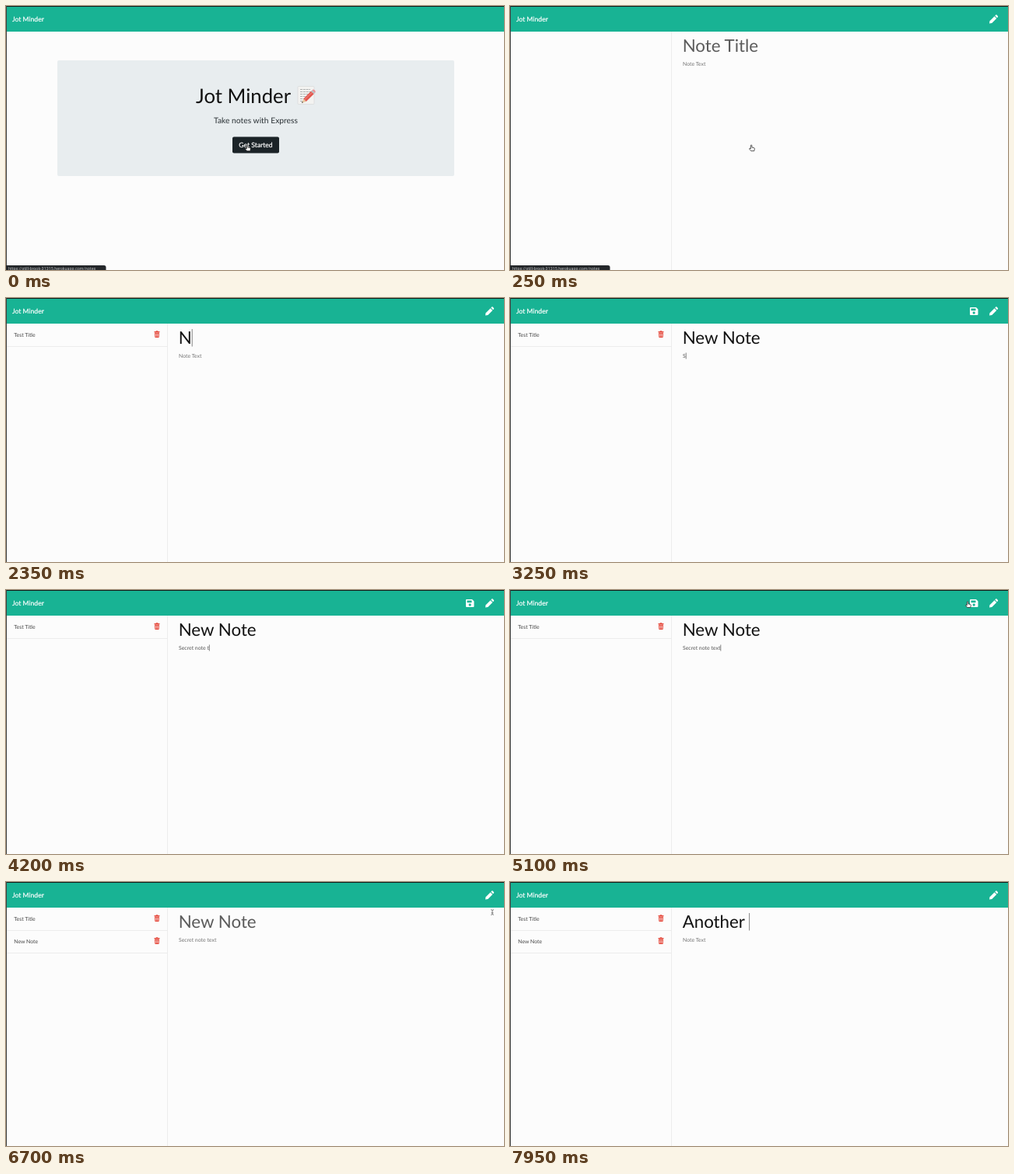
Animation, 640 px wide and 340 px high, one loop 8 s. Source, as an HTML page:

```html
<!DOCTYPE html>
<html lang="en">
<head>
<meta charset="utf-8">
<title>Jot Minder</title>
<style>
  html, body { margin: 0; width: 100%; height: 100%; overflow: hidden; background: #fcfcfc; }
  svg { display: block; width: 640px; height: 340px; }
  text { font: 6.9px Lato, sans-serif; white-space: pre; text-rendering: geometricPrecision; }
  .mid { text-anchor: middle; }
  .onDark { font-size: 8.6px; fill: #fff; stroke: #fff; stroke-width: .22px; }
  .row text { fill: #444; }
  .rule { stroke: #ececec; }
  #title { font-size: 22.3px; }
  #caret { fill: #777; }
  #cursor path { stroke-linejoin: round; stroke-linecap: round; }
</style>
</head>
<body>
<svg viewBox="0 0 640 340">
  <defs>
    <g id="trash" fill="#e5483b">
      <path d="M-3.5-3.7h2l.5-.8h2l.5.8h2v1.1h-7z"/>
      <path fill-rule="evenodd" d="M-3-2.2h6l-.3 5.7q-.1.8-.8.8h-3.8q-.7 0-.8-.8zM-1.7-1v4h.6v-4zM-.3-1v4h.6v-4zM1.1-1v4h.6v-4z"/>
    </g>
  </defs>
  <rect width="640" height="340" fill="#fcfcfc"/>

  <g id="home">
    <rect x="66" y="70" width="510" height="149" rx="2" fill="#e8edef"/>
    <text class="mid" x="305" y="125" style="font-size:25.7px" fill="#111">Jot Minder</text>
    <g>
      <rect x="375" y="103.5" width="21" height="23" rx="1" fill="#f3f3f1" stroke="#d3d5d5" stroke-width=".6"/>
      <path d="M378 107.5h13M378 110.5h15M378 113.5h11M378 116.5h8M378 119.5h6M378 122.5h4" stroke="#a9acac" stroke-width=".9" stroke-dasharray="3 .8"/>
      <path d="M380 125l2.5-5.6 3.3 3.6z" fill="#e8c9a0"/>
      <path d="M382.3 119.4L392 109.8l3.7 3.5-9.9 9.7z" fill="#e2574f"/>
      <path d="M383.6 120.8l10-9.7" stroke="#f08f86" stroke-width="1"/>
      <path d="M392 109.8l1.6-1.6 3.7 3.5-1.6 1.6z" fill="#b9bcbf"/>
      <path d="M393.6 108.2q1.5-1.3 3.1.2 1.8 1.6.6 3.3z" fill="#ee8d92"/>
      <path d="M380 125l.8-1.9 1.1 1.2z" fill="#333"/>
    </g>
    <text class="mid" x="321" y="151.3" style="font-size:10.3px" fill="#2b3236">Take notes with Express</text>
    <rect x="291" y="168.5" width="60" height="21" rx="2" fill="#1b2327"/>
    <text class="mid onDark" x="321" y="182.3">Get Started</text>
  </g>

  <g id="notes">
    <path class="rule" d="M207.5 33V340"/>
    <g class="row" id="row1">
      <text x="10.3" y="50.2">Test Title</text>
      <use href="#trash" x="194" y="46.8"/>
      <path class="rule" d="M1 62.5H207"/>
    </g>
    <g class="row" id="row2">
      <text x="10.3" y="79.2">New Note</text>
      <use href="#trash" x="194" y="75.8"/>
      <path class="rule" d="M1 91.5H207"/>
    </g>
    <text id="title" x="221.7" y="59"></text>
    <text id="body" x="222" y="77"></text>
    <rect id="caret" width=".9"/>
  </g>

  <rect width="640" height="33" fill="#18b394"/>
  <text class="onDark" x="8" y="20.2">Jot Minder</text>
  <path id="save" fill="#fff" fill-rule="evenodd" d="M592 12h7l2.5 2.5v6.5q0 1-1 1h-8.500q-1 0-1-1v-8q0-1 1-1zM592.500 13.400v2.800h6v-2.800zM596.200 17.500a1.600 1.600 0 1 0 .01 0z"/>
  <g id="pencil" fill="#fff">
    <path d="M616 22.500l.6-3.300 6-6 2.700 2.700-6 6z"/>
    <path d="M623.300 12.500l.9-.9q.7-.6 1.400 0l1.300 1.300q.6.700 0 1.400l-.9.900z"/>
  </g>
  <rect width="640" height="1" fill="#151a19"/>
  <rect width="1" height="340" fill="#3c3f3f"/>

  <g id="status">
    <path d="M0 334h126q2.500 0 2.500 2.500V340H0z" fill="#24272a"/>
    <text x="3" y="340" style="font:5.4px Roboto,sans-serif" fill="#b9bcbe">https://still-brook-31315.herokuapp.com/notes</text>
  </g>

  <g id="cursor">
    <path id="hand" fill="#fff" stroke="#222" stroke-width=".75" d="M-1.700.6V-3.200a.8.8 0 0 1 1.600 0V-.9l2.600.5q.9.200.8 1.100L2.800 3.700h-4L-3.300 1.200q-.4-1 .6-1z"/>
    <path id="beam" fill="none" stroke="#666" stroke-width=".8" d="M-1.500-3.300q1.500 0 1.500.8V2.500q0 .8-1.500.8M1.500-3.300q-1.500 0-1.500.8M0 2.500q0 .8 1.500.8M-1 .8h2"/>
    <path id="arrow" fill="#111" stroke="#fff" stroke-width=".5" d="M-2-4v7.400l1.700-1.600 1.100 2.500 1.100-.5-1.100-2.400h2.300z"/>
  </g>
</svg>
<script>
const LOOP = 8000, STEP = 50;
const $ = id => document.getElementById(id);
const show = (id, on) => { $(id).style.display = on ? '' : 'none'; };

// Pointer stops: time, x, y
const path = [
  [0, 311, 183], [350, 311, 183], [900, 105, 48], [950, 105, 48], [1200, 193, 48],
  [1400, 193, 48], [1600, 104, 46], [1700, 104, 46], [2100, 296, 54],
  [4600, 296, 54], [5150, 596, 18], [5450, 596, 18], [5850, 88, 53],
  [6000, 88, 53], [6250, 86, 79], [6350, 86, 79], [6700, 625, 39],
  [6800, 621, 18], [6900, 621, 18], [7200, 312, 53], [LOOP, 312, 53]
];

// Form stages: start, title, body, typed title, typed body, focused field
const EMPTY = ['Note Title', 'Note Text'];
const stages = [
  { at: 0, text: EMPTY },
  { at: 2250, text: EMPTY, focus: 'title', type: 'New Note', from: 2350, pace: 93 },
  { at: 3100, text: ['New Note', 'Note Text'], inkTitle: true,
    focus: 'body', type: 'Secret note text', from: 3250, pace: 78 },
  { at: 5250, text: EMPTY },
  { at: 5950, text: ['Test Title', 'Test text'] },
  { at: 6300, text: ['New Note', 'Secret note text'] },
  { at: 6850, text: EMPTY },
  { at: 7300, text: EMPTY, focus: 'title', type: 'Another ', from: 7350, pace: 75 }
];

function pointerAt(t) {
  const i = path.findIndex(p => p[0] > t);
  const [t0, x0, y0] = path[i - 1], [t1, x1, y1] = path[i];
  const u = (t - t0) / (t1 - t0), k = u * u * (3 - 2 * u);
  return [x0 + (x1 - x0) * k, y0 + (y1 - y0) * k];
}

function pointerKind(t, x, y) {
  if (t < 400) return 'hand';
  if (y < 34) return x > 585 && x < 632 ? 'hand' : 'arrow';
  if (x > 214) return 'beam';
  return y < (t < 5300 ? 62 : 91) ? 'hand' : 'arrow';
}

function drawForm(t) {
  const s = stages.filter(s => s.at <= t).pop();
  const count = s.type ? Math.max(0, Math.floor((t - s.from) / s.pace) + 1) : 0;
  const typed = s.type ? s.type.slice(0, count) : '';
  const inTitle = s.focus === 'title', inBody = s.focus === 'body';
  const title = $('title'), body = $('body');
  title.textContent = inTitle && typed || s.text[0];
  body.textContent = inBody && typed || s.text[1];
  title.setAttribute('fill', s.inkTitle || inTitle && typed ? '#111' : '#5b5b5b');
  body.setAttribute('fill', inBody && typed ? '#555' : '#747474');
  show('caret', s.focus);
  show('save', inBody && typed);
  if (!s.focus) return;
  const field = $(s.focus), caret = $('caret');
  caret.setAttribute('x', +field.getAttribute('x') + (typed ? field.getComputedTextLength() : 0));
  caret.setAttribute('y', inTitle ? 40 : 70.5);
  caret.setAttribute('height', inTitle ? 22.5 : 8);
}

function draw(t) {
  const home = t < 100;
  show('home', home);
  show('notes', !home);
  show('pencil', !home);
  show('status', t < 350);
  show('row1', t >= 300);
  show('row2', t >= 5300);
  drawForm(t);

  const [x, y] = pointerAt(t), kind = pointerKind(t, x, y);
  show('cursor', !(t >= 2350 && t < 4650) && t < 7350);
  $('cursor').setAttribute('transform', `translate(${x} ${y})`);
  for (const id of ['hand', 'beam', 'arrow']) show(id, id === kind);
}

function tick() {
  const t = performance.now() % LOOP;
  draw(Math.floor(t / STEP) * STEP);
  requestAnimationFrame(tick);
}
tick();
</script>
</body>
</html>
```
